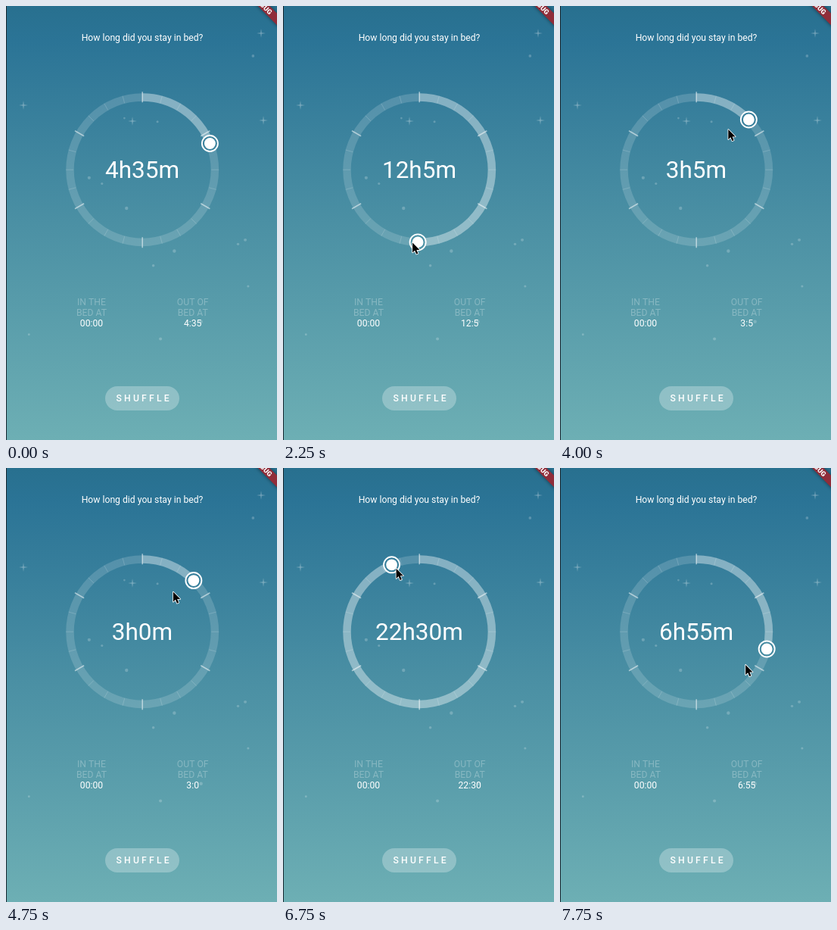
Write an HTML page with a canvas that moves like this. It is 358x573 px and loops after 8000 ms.

```html
<!DOCTYPE html>
<html lang="en">
<head>
<meta charset="utf-8">
<title>Time in bed</title>
<style>
  html, body { margin: 0; width: 100%; height: 100%; overflow: hidden; background: #2a7295; }
  canvas { display: block; width: 358px; height: 573px; }
</style>
</head>
<body>
<canvas id="stage" width="358" height="573"></canvas>
<script>
const W = 358, H = 573, LOOP = 8000, STEP = 250;
const CX = 180.2, CY = 216.2, R = 95.7, TAU = Math.PI * 2;
const ctx = document.getElementById('stage').getContext('2d');

const sky = ctx.createLinearGradient(0, 0, 0, H);
sky.addColorStop(0, '#28708f');
sky.addColorStop(0.08, '#2b7496');
sky.addColorStop(0.5, '#4b90a4');
sky.addColorStop(1, '#6dafb4');

// Each move ends at a dial time, with the pointer at an offset from the handle.
const rest = { end: 0, min: 275, dx: -6, dy: 2 };
const moves = [
  { start: 250, end: 1250, min: 1025, dx: -4, dy: 2 },
  { start: 1500, end: 2500, min: 625, dx: -8, dy: 0 },
  { start: 2750, end: 3000, min: 625, dx: 28, dy: -181 },
  { start: 3000, end: 3250, min: 625, dx: 9, dy: -146 },
  { start: 3500, end: 3750, min: 185, dx: -27, dy: 13 },
  { start: 4250, end: 4500, min: 180, dx: -27, dy: 15 },
  { start: 4750, end: 5500, min: 180, dx: -12, dy: 47 },
  { start: 5500, end: 5750, min: 400, dx: -22, dy: 23 },
  { start: 5750, end: 6750, min: 1350, dx: 6, dy: 5 },
  { start: 6750, end: 7750, min: 1855, dx: -28, dy: 21 }
];

const white = a => `rgba(255,255,255,${a})`;
const rad = deg => deg * Math.PI / 180;
const mix = (a, b, p) => a + (b - a) * p;
const onDial = (deg, r) => [CX + r * Math.sin(rad(deg)), CY - r * Math.cos(rad(deg))];

function poseAt(t) {
  let pose = rest;
  for (const m of moves) {
    if (t <= m.start) break;
    const p = Math.min(1, (t - m.start) / (m.end - m.start));
    pose = {
      min: mix(pose.min, m.min, p),
      dx: mix(pose.dx, m.dx, p),
      dy: mix(pose.dy, m.dy, p)
    };
  }
  return pose;
}

function seeded(seed) {
  return () => (seed = seed * 16807 % 2147483647) / 2147483647;
}

function disc(x, y, r, fill) {
  ctx.beginPath();
  ctx.arc(x, y, r, 0, TAU);
  ctx.fillStyle = fill;
  ctx.fill();
}

function sparkle(x, y, r) {
  ctx.beginPath();
  for (let i = 0; i < 8; i++) {
    const d = i % 2 ? r * 0.18 : r, a = i * TAU / 8;
    ctx.lineTo(x + d * Math.cos(a), y + d * Math.sin(a));
  }
  ctx.fillStyle = white(0.33);
  ctx.fill();
}

function text(str, x, y, size, color = '#fff', weight = 400, align = 'center', spacing = 0) {
  ctx.font = `${weight} ${size}px Roboto, sans-serif`;
  ctx.letterSpacing = spacing + 'px';
  ctx.textAlign = align;
  ctx.fillStyle = color;
  ctx.fillText(str, x, y);
}

function arc(from, to, color) {
  ctx.beginPath();
  ctx.arc(CX, CY, R, rad(from - 90), rad(to - 90));
  ctx.lineWidth = 10.5;
  ctx.strokeStyle = color;
  ctx.stroke();
}

function drawSky() {
  ctx.fillStyle = sky;
  ctx.fillRect(0, 0, W, H);
  const rnd = seeded(4242);
  for (let i = 0; i < 14; i++) {
    disc(20 + rnd() * 310, 60 + rnd() * 380, 1.2 + rnd(), white(0.22));
  }
  for (const [x, y] of [[337, 36], [23, 131], [340, 151], [167, 152]]) sparkle(x, y, 6);
  ctx.fillStyle = '#1b2a33';
  ctx.fillRect(0, 0, 1, H);
}

function drawBanner() {
  ctx.save();
  ctx.translate(350, 9.5);
  ctx.rotate(Math.PI / 4);
  ctx.shadowColor = 'rgba(0,0,0,0.5)';
  ctx.shadowBlur = 5;
  ctx.fillStyle = '#902d3a';
  ctx.fillRect(-60, -5.4, 100, 10.8);
  ctx.shadowColor = 'transparent';
  text('DEBUG', 0, 3.2, 9, '#fff', 900, 'right');
  ctx.restore();
}

function drawDial(deg) {
  arc(0, 360, white(0.155));
  arc(0, deg, white(0.28));
  for (let a = 0; a < 360; a += 15) {
    const major = a % 60 === 0;
    ctx.beginPath();
    ctx.moveTo(...onDial(a, major ? 89 : 91));
    ctx.lineTo(...onDial(a, major ? 103 : 101));
    ctx.lineWidth = major ? 1.6 : 1;
    ctx.strokeStyle = white(major ? 0.52 : 0.17);
    ctx.stroke();
  }
}

function drawHandle(x, y) {
  disc(x, y, 10.5, sky);
  ctx.lineWidth = 1.9;
  ctx.strokeStyle = '#fff';
  ctx.stroke();
  disc(x, y, 7.4, '#fff');
}

function drawPointer(x, y) {
  ctx.save();
  ctx.translate(x, y);
  ctx.scale(0.82, 0.82);
  ctx.lineJoin = 'round';
  const arrow = new Path2D('M0 0V16L3.7 12.6 6.2 18.5 8.9 17.4 6.4 11.6H11.4Z');
  ctx.lineWidth = 2;
  ctx.strokeStyle = '#fff';
  ctx.stroke(arrow);
  ctx.fillStyle = '#000';
  ctx.fill(arrow);
  ctx.restore();
}

function drawColumn(x, top, time) {
  const faint = white(0.28);
  text(top, x, 395, 12.2, faint);
  text('BED AT', x, 409, 12.2, faint);
  text(time, x, 423, 12.2);
}

function drawTimes(h, m) {
  text('How long did you stay in bed?', 180, 46.2, 12.2);
  text(`${h}h${m}m`, 180, 227, 31.5);
  drawColumn(113, 'IN THE', '00:00');
  drawColumn(246.7, 'OUT OF', `${h}:${m}`);
}

function drawButton() {
  ctx.beginPath();
  ctx.roundRect(131, 502, 98, 32, 16);
  ctx.fillStyle = white(0.27);
  ctx.fill();
  text('SHUFFLE', 145.5, 522, 12.2, '#fff', 500, 'left', 3.2);
}

function draw(now) {
  const t = Math.floor((now % LOOP) / STEP) * STEP;
  const pose = poseAt(t);
  const min = Math.round(pose.min / 5) * 5 % 1440;
  const [x, y] = onDial(min / 4, R);
  drawSky();
  drawDial(min / 4);
  drawTimes(Math.floor(min / 60), min % 60);
  drawButton();
  drawHandle(x, y);
  drawBanner();
  if (t >= 500) drawPointer(x + pose.dx, y + pose.dy);
}

const start = performance.now();
function tick() {
  draw(performance.now() - start);
  requestAnimationFrame(tick);
}
tick();
</script>
</body>
</html>
```
